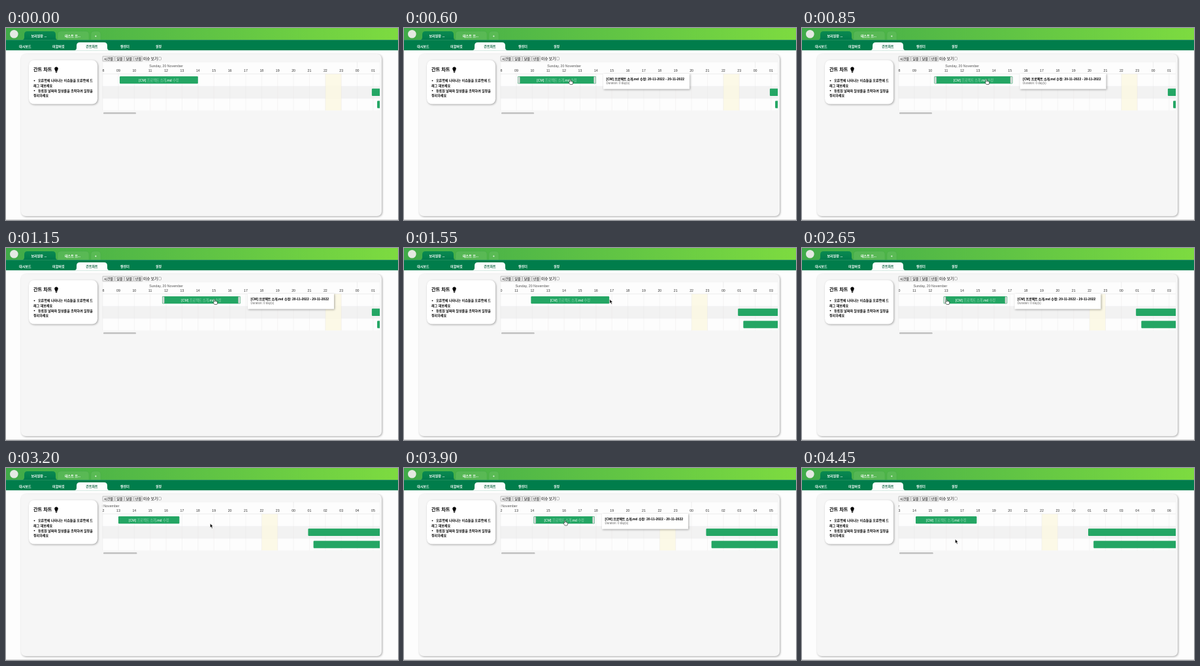
These frames come from a looping animation (600 by 294 pixels, 4500 ms). An HTML page:

```html
<!DOCTYPE html>
<html lang="ko">
<head>
<meta charset="utf-8">
<style>
html, body { margin: 0; width: 100%; height: 100%; overflow: hidden; background: #fdfdfd; }
body > svg { display: block; width: 100vw; height: 100vh; }
text { font-family: "Liberation Sans", Arial, "Noto Sans CJK KR", "Noto Sans CJK", sans-serif; }
.ko { font: 700 5px "Noto Sans CJK KR", "Noto Sans CJK", sans-serif; }
.mid, #chart text { text-anchor: middle; }
.white { fill: #fff; }
#chart text { font-size: 14px; fill: #333; }
#chart .label { fill: #fff; font-weight: 300; }
.label tspan { fill: #8fd3b0; letter-spacing: -.5px; }
.card { filter: drop-shadow(1px 1.5px 1.5px #0005); }
</style>
</head>
<body>
<svg viewBox="0 0 600 294" preserveAspectRatio="none">
  <defs>
    <linearGradient id="sky"><stop stop-color="#40aa49"/><stop offset="1" stop-color="#7ddb40"/></linearGradient>
    <linearGradient id="leaf" x2="0" y2="1"><stop stop-color="#0a8a50"/><stop offset="1" stop-color="#007a4b"/></linearGradient>
  </defs>

  <rect width="600" height="18.3" fill="url(#sky)"/>
  <circle cx="12.3" cy="9.3" r="6.3" fill="#e4e9e2"/>
  <path d="M24 18.3q4 0 4-4v-4.3q0-5 5-5h38q5 0 5 5v4.3q0 4 4 4z" fill="url(#leaf)"/>
  <g fill="#fff" fill-opacity=".07" stroke="#2c8f42" stroke-opacity=".3" stroke-width=".5">
    <path d="M79 18v-8q0-5 5-5h38q5 0 5 5v8"/>
    <path d="M130 18v-8q0-5 5-5h5q5 0 5 5v8"/>
  </g>
  <rect y="18.2" width="600" height="16" fill="#007d4b"/>
  <path d="M104 34.3q4 0 4-4v-3.300q0-5 5-5h37q5 0 5 5v3.300q0 4 4 4z" fill="#fdfdfd"/>
  <g class="ko mid white">
    <text x="50.500" y="13.500">보리된장 ...</text>
    <text x="102" y="13.500">테스트 프...</text>
    <text x="137.300" y="13.500">+</text>
    <text x="29.300" y="29.500">대시보드</text>
    <text x="80.300" y="29.500">미할버킷</text>
    <text x="131.500" y="29.500" fill="#06613c">간트차트</text>
    <text x="182" y="29.500">캘린더</text>
    <text x="233.500" y="29.500">설정</text>
  </g>

  <rect class="card" x="23" y="40" width="552" height="248" rx="7" fill="#f6f6f6"/>
  <rect y="293" width="600" height="1" fill="#d5d5d5"/>
  <rect class="card" x="35" y="49.300" width="105" height="67.300" rx="8" fill="#fff"/>
  <g class="ko">
    <text x="42" y="66.300" font-size="7.2" style="font-size:7.2px">간트 차트</text>
    <text x="49" y="82.300">오른쪽에 나타나는 이슈들을 오른쪽에 드</text>
    <text x="42" y="89.900">래그 해보세요</text>
    <text x="49" y="97.500">등록된 날짜와 달성률을 조작하여 일정을</text>
    <text x="42" y="105.100">정리하세요</text>
  </g>
  <circle cx="43.500" cy="80.600" r=".9"/>
  <circle cx="43.500" cy="95.800" r=".9"/>
  <path d="M75.500 66q-.1-1.200-.8-2a2.800 2.800 0 1 1 4.600 0q-.7.8-.8 2zM75.600 66.500h2.800v.8l-.7.9h-1.400l-.7-.9z"/>

  <g id="buttons"></g>
  <text class="ko" x="210" y="49" style="font-size:5.6px;font-weight:400">이슈 보기</text>
  <rect x="233.200" y="44.700" width="4.300" height="4.300" rx=".8" fill="#fff" stroke="#777" stroke-width=".5"/>

  <svg id="chart" x="147.6" y="51.5" width="424.5" height="75" viewBox="0 0 1132 200">
    <rect width="1132" height="200" fill="#fdfdfd"/>
    <rect y="100" width="1132" height="50" fill="#f2f2f2"/>
    <path d="M0 100H1132M0 150H1132M0 199.500H1132" stroke="#ebeff2"/>
    <g id="world">
      <rect x="1430" y="50" width="65" height="150" fill="#fcf8e3" fill-opacity=".85"/>
      <g id="hours"></g>
      <path d="M1560 0V25" stroke="#e0e0e0" stroke-width="1.5"/>
      <text x="780" y="22.500" style="fill:#555">Sunday, 20 November</text>
      <g fill="#24a664">
        <rect x="1619.500" y="110" width="900" height="30" rx="3"/>
        <rect x="1641.300" y="160" width="900" height="30" rx="3"/>
        <rect id="bar" y="60" height="30" rx="3"/>
      </g>
      <g id="grips" fill="#ddd" stroke="#7fb89a">
        <rect id="gripL" y="61" width="8" height="28" rx="3"/>
        <rect id="gripR" y="61" width="8" height="28" rx="3"/>
      </g>
      <text id="label" class="label" y="80">[CM] <tspan>프로젝트 소개</tspan>.md <tspan>수정</tspan></text>
    </g>
    <path d="M0 .7H1132M0 50H1132M.5 0V200" stroke="#e0e0e0" stroke-width="1.400" fill="none"/>
  </svg>
  <rect id="thumb" x="149" y="129.200" height="2.400" rx="1.200" fill="#bcbcbc"/>

  <g id="tip">
    <rect class="card" width="132" height="23.500" fill="#fff"/>
    <text x="4.500" y="9.700" font-size="5.1" font-weight="700">[CM] <tspan letter-spacing="-.2">프로젝트 소개</tspan>.md <tspan letter-spacing="-.2">수정</tspan>: 20-11-2022 - 20-11-2022</text>
    <text x="4.500" y="15.700" font-size="4.5" fill="#666">Duration: 0 day(s)</text>
  </g>

  <path id="arrow" d="M0 0V6.300L1.500 5 2.600 7.500 3.700 7 2.600 4.600H4.500z" stroke="#fff" stroke-width=".5"/>
  <path id="hand" d="M-.7 4V.6q.7-1.200 1.400 0V3q.8-.5 1.200.2.800-.4 1.200.3 1-.2 1 .8V6L3.300 8H-.2L-2.300 5.200q-.2-1.200.9-.9z" fill="#fff" stroke="#000" stroke-width=".55"/>
</svg>

<script>
const LOOP = 4500, STEP = 50, LEFT = 147.6, HOUR = 24.375, UNIT = 65;
const $ = id => document.getElementById(id);
const set = (id, attrs) => { for (const k in attrs) $(id).setAttribute(k, attrs[k]); };
const show = (id, on) => set(id, { visibility: on ? 'visible' : 'hidden' });
const place = (id, x, y) => set(id, { transform: `translate(${x} ${y})` });

$('buttons').innerHTML = [['시간별', 148, 18], ['일별', 167, 13.6], ['달별', 181.6, 13.4], ['년별', 196, 12.8]]
  .map(([name, x, w]) => `<rect x="${x}" y="43.300" width="${w}" height="7.700" rx=".8" fill="#efefef" stroke="#888" stroke-width=".5"/>
    <text class="ko mid" x="${x + w / 2}" y="49" style="font-weight:400">${name}</text>`).join('');

let ticks = '';
for (let h = 8; h < 33; h++) {
  ticks += `<path d="M${h * UNIT} 50V200" stroke="#e6e4e4"/>
    <text x="${h * UNIT}" y="40">${String(h % 24).padStart(2, '0')}</text>`;
}
$('hours').innerHTML = ticks;

// pointer path: time, x, y
const path = [
  [50, 330, 226], [450, 254.5, 78.5], [600, 254.5, 78.5], [1150, 319.5, 78.5], [1250, 324, 78.5],
  [1450, 324, 78.5], [2050, 200, 78.5], [2250, 200, 78.5], [2800, 226.5, 78.5], [2950, 226.5, 79],
  [3200, 312.5, 85], [3300, 312.5, 85], [3550, 221, 80], [3600, 221, 80], [3850, 246.5, 80],
  [4000, 246.5, 80], [4200, 234.5, 85.5], [4449, 234.5, 85.5], [4450, 234.5, 109], [LOOP, 234.5, 109]
];

function pointer(t) {
  const i = Math.max(1, path.findIndex(p => p[0] >= t));
  const [t0, x0, y0] = path[i - 1], [t1, x1, y1] = path[i];
  const u = Math.max(0, (t - t0) / (t1 - t0)), e = u * u * (3 - 2 * u);
  return [x0 + (x1 - x0) * e, y0 + (y1 - y0) * e];
}

// hours dragged between press and release, in five-minute steps
function drag(t, press, release) {
  const now = Math.min(Math.max(t, press), release);
  return Math.round((pointer(now)[0] - pointer(press)[0]) / HOUR * 12) / 12;
}

function draw(t) {
  const [x, y] = pointer(t);
  const moved = drag(t, 600, 1300) + drag(t, 3600, 3950);
  const start = 109 / 12 + moved + drag(t, 2250, 2850), end = 14 + moved;
  const view = t < 1300 ? 8 : t < 2850 ? 10 : t < 3950 ? 12 : 13;
  const px = h => LEFT + (h - view) * HOUR;
  const between = (a, b) => t >= a && t < b;
  const held = between(600, 1300) || between(2250, 2850) || between(3600, 3950);
  const over = t >= 50 && (held || x > px(start) && x < px(end) && y > 74 && y < 85.25);

  place('world', -view * UNIT, 0);
  set('bar', { x: start * UNIT, width: (end - start) * UNIT });
  set('gripL', { x: start * UNIT + 1 });
  set('gripR', { x: end * UNIT - 9 });
  set('label', { x: (start + end) / 2 * UNIT });
  set('thumb', { width: 50 + (view - 8) * .36 });
  place('tip', px(end) + 11.2, 70);
  place('arrow', x, y);
  place('hand', x, y);
  show('grips', over);
  show('tip', over && (t < 1300 || between(2250, 2850) || between(3400, 3950)));
  show('hand', over);
  show('arrow', t >= 50 && !over);
}

const began = performance.now();
function frame() {
  const t = (performance.now() - began) % LOOP;
  draw(Math.floor(t / STEP) * STEP);
  requestAnimationFrame(frame);
}
frame();
</script>
</body>
</html>
```
